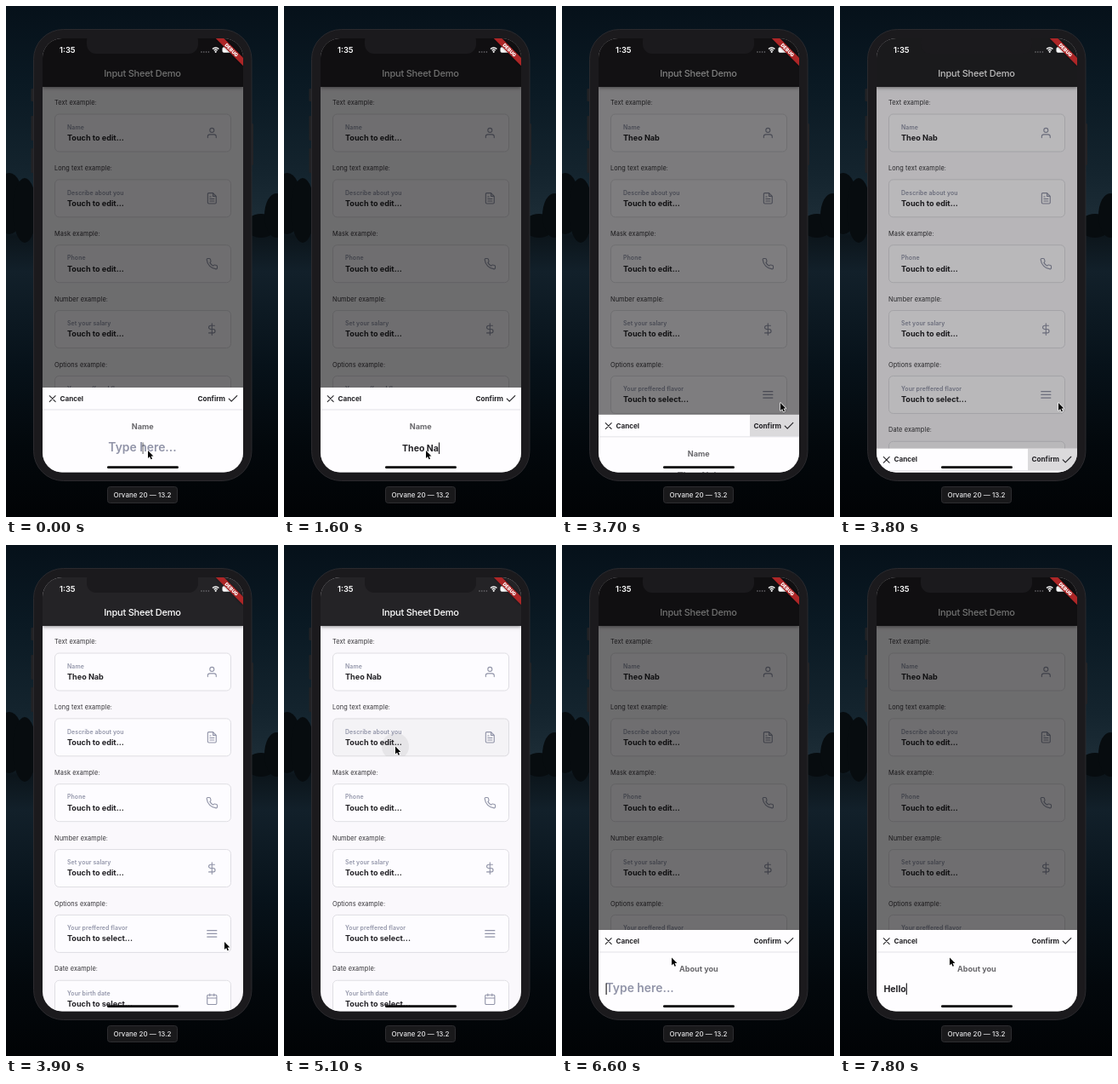
Write an HTML page with a canvas that moves like this. It is 320 px wide and 600 px high and loops after 8000 ms.

```html
<!DOCTYPE html>
<html lang="en">
<head>
<meta charset="utf-8">
<title>Input Sheet Demo</title>
<style>
html, body { margin: 0; width: 100%; height: 100%; overflow: hidden; background: #03080c; }
canvas { display: block; width: 320px; height: 600px; }
</style>
</head>
<body>
<canvas></canvas>
<script>
const LOOP = 8000, STEP = 100;
const NAME = 'Theo Nab', HELLO = 'Hello', DEVICE = 'Orvane 20 — 13.2';
const INK = '#232226', MUTED = '#9194a8';
const SCREEN = [43, 38, 236, 509.5];

const canvas = document.querySelector('canvas');
const c = canvas.getContext('2d');
const dpr = window.devicePixelRatio || 1;
canvas.width = 320 * dpr;
canvas.height = 600 * dpr;

const ICONS = {
  user: 'M20 21v-2a4 4 0 0 0-4-4H8a4 4 0 0 0-4 4v2M16 7a4 4 0 1 1-8 0a4 4 0 1 1 8 0',
  file: 'M14 2H6a2 2 0 0 0-2 2v16a2 2 0 0 0 2 2h12a2 2 0 0 0 2-2V8zM14 2v6h6M16 13H8M16 17H8M10 9H8',
  phone: 'M22 16.9v3a2 2 0 0 1-2.2 2A19.8 19.8 0 0 1 2.1 4.2 2 2 0 0 1 4.1 2h3a2 2 0 0 1 2 1.7c.1 1 .4 1.9.7 2.8a2 2 0 0 1-.5 2.1L8.1 9.9a16 16 0 0 0 6 6l1.3-1.3a2 2 0 0 1 2.1-.4c.9.3 1.8.6 2.8.7a2 2 0 0 1 1.7 2z',
  dollar: 'M12 1v22M17 5H9.5a3.5 3.5 0 0 0 0 7h5a3.5 3.5 0 0 1 0 7H6',
  menu: 'M3 12h18M3 6h18M3 18h18',
  calendar: 'M5 4h14a2 2 0 0 1 2 2v14a2 2 0 0 1-2 2H5a2 2 0 0 1-2-2V6a2 2 0 0 1 2-2zM16 2v4M8 2v4M3 10h18',
  close: 'M18 6L6 18M6 6l12 12',
  check: 'M20 6L9 17l-5-5'
};

const ITEMS = [
  ['Text example:', 'Name', 'Touch to edit...', 'user'],
  ['Long text example:', 'Describe about you', 'Touch to edit...', 'file'],
  ['Mask example:', 'Phone', 'Touch to edit...', 'phone'],
  ['Number example:', 'Set your salary', 'Touch to edit...', 'dollar'],
  ['Options example:', 'Your preffered flavor', 'Touch to select...', 'menu'],
  ['Date example:', 'Your birth date', 'Touch to select...', 'calendar']
];

// Times at which each further letter appears
const NAME_KEYS = [100, 200, 300, 400, 1000, 1100, 1600, 1900];
const HELLO_KEYS = [6900, 7100, 7400, 7600, 7800];

// Pointer stops: time, x, y
const POINTER = [
  [2300, 167, 522], [2600, 195, 514], [2900, 280, 492], [3200, 257, 466],
  [3900, 257, 466], [4000, 309, 425], [4100, 270, 320], [4600, 77, 252],
  [5000, 131, 236.5], [5500, 131, 236.5], [6000, 129, 484.5]
];

const clamp = v => Math.max(0, Math.min(1, v));
const ramp = (t, from, span) => clamp((t - from) / span);
const smooth = p => p * p * (3 - 2 * p);

function box(x, y, w, h, r, fill, line) {
  c.beginPath();
  c.roundRect(x, y, w, h, r);
  if (fill) { c.fillStyle = fill; c.fill(); }
  if (line) { c.strokeStyle = line; c.lineWidth = 1; c.stroke(); }
}

function disc(x, y, r, fill, ry = r) {
  c.beginPath();
  c.ellipse(x, y, r, ry, 0, 0, 7);
  c.fillStyle = fill;
  c.fill();
}

// y is the middle of the capitals
function text(s, x, y, size, weight, fill, align = 'left', spacing = 0) {
  c.font = `${weight} ${size}px Inter, "Open Sans", sans-serif`;
  c.letterSpacing = spacing + 'px';
  c.textAlign = align;
  c.fillStyle = fill;
  c.fillText(s, x, y + size * .36);
  return c.measureText(s).width;
}

function icon(name, x, y, scale, color, width) {
  c.save();
  c.translate(x - 12 * scale, y - 12 * scale);
  c.scale(scale, scale);
  c.strokeStyle = color;
  c.lineWidth = width;
  c.lineCap = c.lineJoin = 'round';
  c.stroke(new Path2D(ICONS[name]));
  c.restore();
}

function clipped(rect, draw) {
  c.save();
  c.beginPath();
  c.roundRect(...rect);
  c.clip();
  draw();
  c.restore();
}

function backdrop() {
  const g = c.createLinearGradient(0, 0, 0, 600);
  [[0, '#06111a'], [.15, '#0a1923'], [.33, '#14242e'], [.42, '#1d2d37'], [.45, '#0c151b'],
   [.52, '#12202a'], [.7, '#07121a'], [.86, '#03080c'], [1, '#010305']]
    .forEach(s => g.addColorStop(...s));
  c.fillStyle = g;
  c.fillRect(0, 0, 320, 600);
  [[4, 232, 17, 36], [22, 240, 14, 38], [300, 258, 18, 14], [318, 246, 14, 26]]
    .forEach(([x, y, rx, ry]) => disc(x, y, rx, '#070c0f', ry));
}

function phone() {
  [[29.5, 97, 15], [29.5, 129, 29], [29.5, 167, 29], [288, 138, 49]]
    .forEach(([x, y, h]) => box(x, y, 3, h, 1, '#222225'));
  box(32.5, 27.5, 256.5, 530, 35, '#1b1a1d', '#2b2a2e');
}

function card([label, hint, value, glyph], i, t) {
  const y = 76.85 * i;
  const rect = [57.5, 127 + y, 207, 44, 5];
  text(label, 57, 113.5 + y, 7.35, 400, '#323135', 'left', .12);
  box(...rect, '#fdfcff', '#dfdee3');
  if (i === 1 && t >= 5100 && t < 5500) clipped(rect, () => {
    const fade = 1 - ramp(t, 5200, 300);
    c.fillStyle = `rgba(0,0,0,${.035 * fade})`;
    c.fillRect(...rect.slice(0, 4));
    disc(131, 236.5, 16 + 110 * ramp(t, 5100, 300), `rgba(0,0,0,${.06 * fade})`);
  });
  text(hint, 72, 142.3 + y, 6.9, 600, MUTED, 'left', .1);
  text(i || t < 3600 ? value : NAME, 72, 154.6 + y, 9.1, 700, INK);
  icon(glyph, 242.3, 149 + y, .62, MUTED, 1.8);
}

function page(t) {
  c.fillStyle = '#faf8fc';
  c.fillRect(...SCREEN);
  ITEMS.forEach((item, i) => card(item, i, t));
  c.save();
  c.shadowColor = 'rgba(0,0,0,.45)';
  c.shadowBlur = 4 * dpr;
  c.shadowOffsetY = dpr;
  c.fillStyle = '#242326';
  c.fillRect(43, 38, 236, 57);
  c.restore();
  text('Input Sheet Demo', 160.5, 78.7, 11, 500, '#fff', 'center', -.22);
}

// Half-second on and off with a quarter-second fade
function blink(age) {
  const p = (age + 10000) % 1000;
  const fade = ramp(p, p < 500 ? 0 : 500, 250);
  return p >= 500 ? 1 - fade : age < 500 ? 1 : fade;
}

function field(t, typed, keys, x, y, align, idle) {
  const count = keys.filter(k => k <= t).length;
  const s = typed.slice(0, count);
  let caret = x;
  if (count) {
    const w = text(s, x, y + 1, 10.5, 700, INK, align);
    caret += align === 'center' ? w / 2 : w;
  } else {
    text('Type here...', x, y, 13.9, 600, MUTED, align);
  }
  c.globalAlpha = blink(t - (count ? keys[count - 1] : idle));
  c.fillStyle = INK;
  c.fillRect(caret, y - 5.5, 1.2, 13.5);
  c.globalAlpha = 1;
}

function sheet(t, first) {
  const height = first ? 99.5 : 95.5;
  const shown = first
    ? 1 - ramp(t, 3620, 250) 
    : 1 - (1 - ramp(t, 5150, 250)) ** 3;
  if (!shown) return;
  const dim = first ? 1 - (1 - shown) ** 2 : shown;
  c.fillStyle = `rgba(0,0,0,${.56 * dim})`;
  c.fillRect(...SCREEN);

  const top = 547.5 - height * shown;
  c.fillStyle = '#fefdff';
  c.fillRect(43, top, 236, height);
  if (first && t >= 3300) clipped([221, top, 58, 26, 0], () => {
    c.fillStyle = 'rgba(0,0,0,.05)';
    c.fillRect(221, top, 58, 26);
    disc(257, top + 18, 12 + 40 * ramp(t, 3300, 300), 'rgba(0,0,0,.09)');
  });
  c.fillStyle = '#e3e2e7';
  c.fillRect(43, top + 25.5, 236, 1);
  icon('close', 54.7, top + 13.2, .58, INK, 1.8);
  text('Cancel', 63.5, top + 12.8, 8.1, 700, INK);
  text('Confirm', 258, top + 12.8, 8.2, 700, INK, 'right');
  icon('check', 267, top + 13.2, .6, INK, 1.9);
  text(first ? 'Name' : 'About you', 160.8, top + 45.7, 9.1, 700, '#69686c', 'center');
  if (first) field(t, NAME, NAME_KEYS, 160.5, top + 70, 'center', -600);
  else field(t, HELLO, HELLO_KEYS, 51.5, top + 68, 'left', 5300);
}

function statusBar() {
  text('1:35', 63, 51.8, 9.3, 600, '#fff');
  for (let i = 0; i < 4; i++) disc(230 + i * 2.8, 54, .8, '#77767a');
  c.strokeStyle = '#fff';
  c.lineWidth = 1.4;
  c.lineCap = 'butt';
  [2.8, 5.2].forEach(r => {
    c.beginPath();
    c.arc(246.7, 54.2, r, -2.36, -.78);
    c.stroke();
  });
  disc(246.7, 53.8, 1.1, '#fff');
  box(254.5, 48.3, 12.5, 6.4, 1.8, '#fff');
}

function banner() {
  c.save();
  c.translate(279, 38);
  c.rotate(Math.PI / 4);
  c.shadowColor = 'rgba(0,0,0,.5)';
  c.shadowBlur = 3 * dpr;
  c.fillStyle = '#ad2627';
  c.fillRect(-23, 16, 46, 6.8);
  c.shadowBlur = 0;
  text('DEBUG', 0, 19.4, 5.6, 900, '#fff', 'center');
  c.restore();
}

function pointer(t) {
  let i = POINTER.findIndex(k => k[0] > t);
  if (i < 0) i = POINTER.length - 1;
  const b = POINTER[i], a = POINTER[Math.max(0, i - 1)];
  const p = b === a ? 0 : smooth(ramp(t, a[0], b[0] - a[0]));
  c.save();
  c.translate(a[1] + (b[1] - a[1]) * p, a[2] + (b[2] - a[2]) * p);
  const arrow = new Path2D('M0 0V9L2.1 7.1 3.5 10.3 5 9.7 3.6 6.6 6.4 6.5z');
  c.strokeStyle = '#fff';
  c.lineWidth = 1.3;
  c.lineJoin = 'round';
  c.stroke(arrow);
  c.fillStyle = '#000';
  c.fill(arrow);
  c.restore();
}

function draw(t) {
  c.setTransform(dpr, 0, 0, dpr, 0, 0);
  backdrop();
  phone();
  clipped([...SCREEN, 23], () => {
    page(t);
    sheet(t, t < 4500);
    statusBar();
    banner();
    box(95, 30, 131, 26, 11, '#1b1a1d');
    box(119, 540.2, 84, 2.9, 1.45, '#000');
  });
  box(119.5, 564.5, 82, 19, 3, '#19191b', '#2d2d30');
  text(DEVICE, 160.5, 574.2, 8, 500, '#e4e4e6', 'center');
  pointer(t);
}

const start = performance.now();
function tick() {
  const t = (performance.now() - start) % LOOP;
  draw(Math.floor(t / STEP) * STEP);
  requestAnimationFrame(tick);
}
tick();
</script>
</body>
</html>
```
